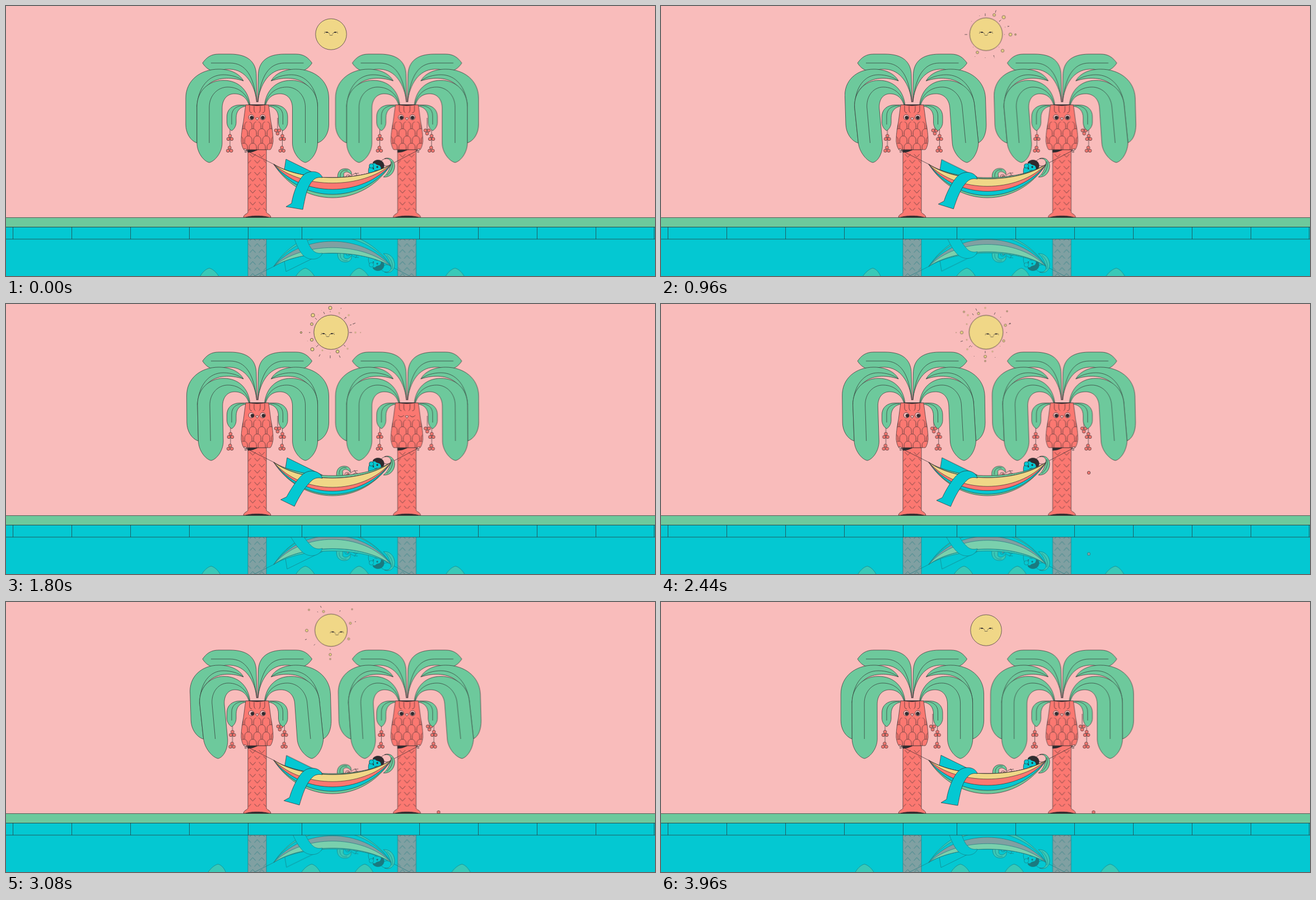
Animation, 1159 px wide and 483 px high, one loop 4 s. Source, as an HTML page without scripts:

```html
<!DOCTYPE html>
<html lang="en">
<head>
<meta charset="utf-8">
<title>Hammock between palms</title>
<style>
:root { --pink:#f9bcbb; --green:#6dc99c; --red:#fb7871; --sea:#04c8d2; --sun:#f0d787; --ink:#2f2b2e; --swing:cubic-bezier(.37,0,.63,1) }
html, body { margin:0; width:100%; height:100%; overflow:hidden; background:var(--pink) }
svg { position:absolute; left:0; top:0; width:1159px; height:483px; overflow:visible }
svg, pattern { stroke:var(--ink); stroke-width:.68; stroke-linejoin:round }
.pink { fill:var(--pink) } .green { fill:var(--green) } .red { fill:var(--red) }
.sea { fill:var(--sea) } .yellow { fill:var(--sun) } .dark { fill:var(--ink) }
.line { fill:none }

/* The scene mirrors itself in the pool */
.scene {
  position:absolute; left:0; top:0; width:1159px; height:374px;
  -webkit-box-reflect:below 1px linear-gradient(rgba(0,0,0,.5), rgba(0,0,0,.5));
}

/* Fronds: one sway curve per side of each palm */
.e1 *, .e2 *, .e3 *, .e4 * { animation-duration:4s; animation-iteration-count:infinite }
.e1 * { animation-timing-function:linear(0,.1 4.8%,.5 12%,.88 20%,1 27%,.93 32%,.5 39.5%,.1 47%,0 52%,.1 56.8%,.5 64%,.9 71.2%,1 76%,.9 80.8%,.5 88%,.1 95.2%,0) }
.e2 * { animation-timing-function:linear(0,.09 4.5%,.45 11%,.81 18%,.9 22.5%,.81 27%,.45 34%,.09 41%,0 45.5%,.09 51%,.45 60%,.81 69%,.9 74.5%,.81 79.6%,.45 87%,.09 95%,0) }
.e3 * { animation-timing-function:linear(0,.09 5%,.43 12%,.77 20%,.85 26%,.77 30%,.43 36%,.09 42%,0 45%,.07 50%,.33 59.5%,.6 69%,.66 75%,.6 80%,.33 87.5%,.07 95%,0) }
.e4 * { animation-timing-function:linear(0,.1 3.6%,.5 9%,.9 14.4%,1 18%,.9 22.8%,.5 30%,.1 37.2%,0 42%,.1 47%,.5 56%,.9 66%,1 72%,.9 78%,.5 86%,.1 94.4%,0) }
.out { d:path("M341 245C329 241 321 227 321 212L321 165C321 133 347 113 380 113C402 113 418 122 424 134C400 126 376 128 362 140C350 150 341 165 341 180L341 245Z") }
.vein { d:path("M341 180C343 145 362 123 388 123C402 123 415 127 424 134") }
.in { d:path("M363 280C353 278 341 262 341 245L341 180C341 152 362 133 388 133C415 133 433 150 436 178L434 178C430 163 420 157 408 157C395 157 386 167 386 183L386 245C386 262 373 278 363 280Z") }
.rib { d:path("M363 245L363 181C363 160 378 145 396 145C418 145 432 160 435 178") }
.l .out { animation-name:outL } .r .out { animation-name:outR }
.l .vein { animation-name:veinL } .r .vein { animation-name:veinR }
.l .in { animation-name:inL } .r .in { animation-name:inR }
.l .rib { animation-name:ribL } .r .rib { animation-name:ribR }
.hang { animation-name:hang }
@keyframes outL { to { d:path("M352 245C340 241 331 227 330.5 212L329 165C326 133 350 113 380 113C402 113 418 122 424 134C400 126 378 128 364 140C352 150 345 165 346 182L353 245Z") } }
@keyframes veinL { to { d:path("M346 182C346 145 364 123 388 123C402 123 415 127 424 134") } }
@keyframes inL { to { d:path("M379 280C369 278 355 262 353 245L346 182C344 154 364 133 389 133C415 133 433 150 436 178L434 178C430 163 420 157 409 157C397 157 389 167 390 183L396 245C397 262 389 278 379 280Z") } }
@keyframes ribL { to { d:path("M374 245L368 181C367 160 380 145 397 145C418 145 432 160 435 178") } }
@keyframes outR { to { d:path("M330 245C320 241 316 227 316 212L317.5 165C319 133 346 113 380 113C402 113 418 122 424 134C400 126 376 128 361 140C349 150 338 165 337 180L329 245Z") } }
@keyframes veinR { to { d:path("M337 180C340 145 361 123 388 123C402 123 415 127 424 134") } }
@keyframes inR { to { d:path("M349.5 280C340 278 330 262 329 245L337 178C339 152 361 133 388 133C415 133 433 150 436 178L434 178C430 163 420 157 406 157C392 157 382 167 381 183L376 245C375 262 360 278 349.5 280Z") } }
@keyframes ribR { to { d:path("M352 245L359 181C361 160 377 145 395 145C418 145 432 160 435 178") } }
@keyframes hang { to { transform:translateX(4.5px) } }

/* Hammock and legs */
.b1 { d:path("M478 283C530 363 636 363 688 283C636 315 530 315 478 283Z") }
.b2 { d:path("M478 283C530 355 636 355 688 283C636 315 530 315 478 283Z"); animation:b2 4s var(--swing) infinite }
.b3 { d:path("M478 283C530 343 636 343 688 283C636 315 530 315 478 283Z"); animation:b3 4s var(--swing) infinite }
.b4 { d:path("M478 283C530 328 636 328 688 283C636 315 530 315 478 283Z"); animation:b4 4s var(--swing) infinite }
.leg { d:path("M565 307C562 297 548 293 536 299C524 305 513 333 510 353L500 359L530 364C534 345 537 322 549 311C553 307 559 306 565 307Z"); animation:leg 4s var(--swing) infinite }
.shin { animation:shin 4s var(--swing) infinite }
.pal { animation:pal 4s var(--swing) infinite }
@keyframes b2 { 47.5% { d:path("M478 283C530 360 636 360 688 283C636 321 530 321 478 283Z") } }
@keyframes b3 { 47.5% { d:path("M478 283C530 352 636 352 688 283C636 321 530 321 478 283Z") } }
@keyframes b4 { 47.5% { d:path("M478 283C530 343 636 343 688 283C636 321 530 321 478 283Z") } }
@keyframes leg { 47.5% { d:path("M565 312C562 300 546 295 534 302C523 308 508 332 501 345L490.5 350L515 362C522 347 534 326 547 315C552 311 559 310 565 312Z") } }
@keyframes shin { 47.5% { transform:translate(2px,1px) } }
@keyframes pal { 47.5% { transform:translate(-2px,-1px) } }

/* Sun */
.disc { transform-origin:580.5px 50.5px; animation:swell 4s var(--swing) infinite }
.face { animation:glance 4s ease-in-out infinite }
.a { --d:-3.9s } .b { --d:-3.25s } .c { --d:-2.35s }
.rays circle { fill:var(--sun); transform-box:fill-box; transform-origin:center; animation:pop 4s var(--d) ease-in-out infinite }
.rays path { fill:none; stroke-dasharray:6 30; animation:dash 4s var(--d) linear infinite }
@keyframes swell { 47.5% { transform:scale(1.11) } }
@keyframes glance { 0%,24%,98%,100% { transform:none } 32%,47% { transform:translate(-6px,6px) } 58%,80% { transform:translate(10.5px,6.5px) } }
@keyframes pop { 0%,55%,100% { transform:scale(0) } 27% { transform:scale(1) } }
@keyframes dash { 0% { stroke-dashoffset:6.5 } 27% { stroke-dashoffset:0 } 55%,100% { stroke-dashoffset:-6.5 } }

.look { animation:look 4s infinite }
.blink { animation:blink 4s step-end infinite }
.drop { animation:drop 4s infinite }
@keyframes look { 0%,38%,92%,100% { transform:none } 43%,85% { transform:translateX(1.3px) } }
@keyframes blink { 43% { opacity:0 } 47% { opacity:1 } }
@keyframes drop {
  0% { transform:translate(764px,260px); opacity:0; animation-timing-function:step-end }
  55% { transform:translate(764px,260px); opacity:1; animation-timing-function:cubic-bezier(.33,0,.67,.33) }
  65% { transform:translate(764px,376px); animation-timing-function:ease-out }
  68% { transform:translate(768px,368px); animation-timing-function:ease-in }
  71% { transform:translate(771px,376px) }
  74%,100% { transform:translate(772.5px,376px); opacity:1 }
}
</style>
</head>
<body>
<svg viewBox="0 0 1159 483">
  <path class="sea" stroke="none" d="M0 417H1159V483H0Z"/>
  <circle class="yellow disc" cx="580.5" cy="50.5" r="27.7"/>
  <g class="face line">
    <path d="M568 49q5-6 10 1M583 50q5-7 10-1M577.500 51q1.500 3 3 1q1.500 2 3-1M570 46.500l-1-1M591 46.500l1-1"/>
    <path class="dark" stroke="none" d="M571 48q2-4 4.500 0ZM585.500 48q2.500-4 4.500 0Z"/>
  </g>
  <g class="rays a">
    <circle cx="565" cy="83" r="2.500"/><circle cx="595" cy="16" r="2.600"/><circle cx="612" cy="20" r="3.200"/><circle cx="624" cy="51" r="3"/>
    <circle cx="633" cy="51" r="1.500"/><circle cx="610" cy="80" r="2.800"/>
    <path d="M579 18v-5M604 28l4-4M597 12l1.500-5M547 51h-6M619 37l3-1M594 88l1 3"/>
  </g>
  <g class="rays b">
    <circle cx="579" cy="7" r="3"/><circle cx="548" cy="20" r="3.200"/><circle cx="546" cy="36" r="2.400"/><circle cx="527" cy="51" r="1.600"/>
    <circle cx="546" cy="64" r="2.600"/><circle cx="547" cy="81" r="3"/><circle cx="592" cy="85" r="2.800"/>
    <path d="M555 28l-3-3M558 73l-4 4M603 73l3 3M614 38l3-1M619 36l5-2M561 90l-2 4M579 92v5M595 92l2 4M613 51h5M569 18l-2-4M604 27l3-4"/>
  </g>
  <g class="rays c">
    <circle cx="618" cy="13" r="1.400"/><circle cx="541" cy="14" r="1.700"/><circle cx="567" cy="17" r="2.500"/><circle cx="537" cy="51" r="3"/>
    <circle cx="615" cy="38" r="2.400"/><circle cx="612" cy="66" r="2.300"/><circle cx="579" cy="94" r="2.800"/><circle cx="579" cy="102" r="1.500"/>
    <path d="M564 12l-2.500-5M539 66l-5 1.500M553 74l-3 3.500M579 88v-4M558 20l-2-3M595 19l2-4M621 36l4-1"/>
  </g>
</svg>

<div class="scene">
<svg viewBox="0 0 1159 483">
<defs>
  <pattern id="scales" x="440.700" y="206" width="16" height="26" patternUnits="userSpaceOnUse">
    <path class="line" d="M1.500 13V8C1.500-2 14.500-2 14.500 8V13M-6.500 26v-5c0-10 13-10 13 0v5M9.500 26v-5c0-10 13-10 13 0v5"/>
  </pattern>
  <pattern id="bark" x="432.5" y="261" width="16.2" height="21.4" patternUnits="userSpaceOnUse">
    <path class="line" d="M3 4l5.100 5.500 5.100-5.500M-5.100 14.700l5.100 5.500 5.100-5.500M11.100 14.700l5.100 5.500 5.100-5.500"/>
  </pattern>
  <g id="cluster" class="red"><circle cy="-3.2" r="2.8"/><circle cx="-3" cy="2.4" r="2.8"/><circle cx="3" cy="2.4" r="2.8"/></g>
  <g id="strand">
    <path d="M0 200V254"/><use href="#cluster" y="235.5"/><use href="#cluster" x="-.7" y="256.5"/>
  </g>
  <g id="pair">
    <path d="M0 200V222"/><use href="#cluster" transform="matrix(1 0 0 -1 0 225)"/>
  </g>
  <g id="plume">
    <path class="green" d="M351 102C358 92 366 86 380 86H400C432 86 447 100 447 125L448 172C444 140 428 114 400 113C385 112 385 117 376 117C364 117 356 110 351 102Z"/>
    <path class="line" d="M366 102H400C428 102 443 125 447.5 172"/>
  </g>
  <g id="sprig">
    <path class="green" d="M403 223C399 221 394.5 215 394.5 208V198C394.5 185 404 177 418 177H437L430 179C418 180 411 188 411 200V208C411 215 407 221 403 223Z"/>
    <path class="line" d="M403 212V197C403 185 411 178 426 178"/>
  </g>
  <g id="crown"><use href="#plume"/><use href="#plume" transform="matrix(-1 0 0 1 897.5 0)"/></g>
  <g id="trunk">
    <use href="#sprig"/><use href="#sprig" transform="matrix(-1 0 0 1 897.5 0)"/>
    <path class="red" d="M432 257H465V369C466 372 472 372 473 378H424C425 372 431 372 432 369Z"/>
    <path fill="url(#bark)" stroke="none" d="M432.5 261H464.5V366H432.5Z"/>
    <path class="dark" d="M428 378C436 374.5 461 374.5 469 378Z"/>
    <path class="red" d="M428 177L424 207C421 222 420 232 420 242C421 250 423 255 425 257H472C474 255 476 250 477 242C477 232 476 222 473 207L469 177Z"/>
    <path fill="url(#scales)" stroke="none" d="M424 207C421 222 420 232 420 242L425 257H472L477 242C477 232 476 222 473 207Z"/>
    <path class="dark" d="M434 176.5Q448 180 463 176.5Z"/>
    <path class="line" d="M435 178v8q0 5 4 5M462 178v8q0 5-4 5M443 179v7q0 4 2.500 5M454 179v7q0 4-2.500 5M433 199q5 6 10 0M453.500 199q5 6 10 0"/>
    <path class="pink" d="M445.500 200.500q3-2 6 0l-3 4Z"/>
    <path class="dark" d="M432 257.500H449Q440 262 432 262Z"/>
  </g>
  <g id="whites" class="pink"><circle cx="438" cy="199" r="4.800"/><circle cx="458.500" cy="199" r="4.800"/></g>
  <g id="pupils" class="dark"><circle cx="438.800" cy="199.800" r="3"/><circle cx="458.500" cy="199.800" r="3"/></g>
  <path id="bow" class="pink" d="M0 0q-7-5-6-1q1 3 6 1q-6 2-4 4q3 1 4-4Z"/>
</defs>

<g class="e1"><g class="hang"><use href="#strand" x="400"/></g></g>
<g class="e2"><g class="hang"><use href="#strand" x="493.500"/><use href="#pair" x="485"/></g></g>
<g class="e3"><g class="hang"><use href="#strand" x="667.500"/></g></g>
<g class="e4"><g class="hang"><use href="#strand" x="760"/><use href="#pair" x="752"/></g></g>

<use href="#crown"/>
<g class="l e1"><path class="green out"/><path class="line vein"/><path class="green in"/><path class="line rib"/></g>
<g class="r e2" transform="matrix(-1 0 0 1 897.5 0)"><path class="green out"/><path class="line vein"/><path class="green in"/><path class="line rib"/></g>
<use href="#trunk"/>
<use href="#whites"/><g class="look"><use href="#pupils"/></g>

<g transform="translate(267.4)">
  <use href="#crown"/>
  <g class="l e3"><path class="green out"/><path class="line vein"/><path class="green in"/><path class="line rib"/></g>
  <g class="r e4" transform="matrix(-1 0 0 1 897.5 0)"><path class="green out"/><path class="line vein"/><path class="green in"/><path class="line rib"/></g>
  <use href="#trunk"/>
  <g class="blink"><use href="#whites"/><use href="#pupils"/></g>
</g>

<path class="line" d="M428 258L478 283M736 258L688 283"/>
<use href="#bow" x="431" y="258"/><use href="#bow" transform="matrix(-1 0 0 1 733 258)"/>

<g class="pal">
  <path class="green" d="M593 313C590 298 596 291 606 291C614 291 618 296 617 302C612 296 606 295 603 300L604 313Z"/>
  <path class="line" d="M597 306C596 297 602 292 610 294M616 304l6-4 8-1M621 306l5-3 4 1M624 298l3 5"/>
  <circle class="line" cx="611" cy="306" r="4"/><circle class="red" cx="612" cy="306" r="1.800"/>
</g>
<path class="sea shin" d="M500 274L497 293L530 310H563V305Z"/>
<path class="dark" d="M655 280C660 273 673 274 675 284C676 291 671 294 664 291Z"/>
<path class="sea" d="M648 301C645 292 650 281 659 281C661 284 664 284 667 285C671 288 671 294 667 299Z"/>
<circle class="sea" cx="652.500" cy="286" r="4"/>
<path class="line" d="M658 294q3 2 5-1M655 290l2-2"/>
<circle class="dark" cx="663" cy="288" r="1.300"/><circle class="dark" cx="656" cy="291" r="1"/>
<path class="line" d="M669 279C673 272 683 271 688 276L687 285Q678 288 672 283"/>

<path class="green b1"/><path class="sea b2"/><path class="red b3"/><path class="yellow b4"/>
<path class="sea leg"/>
<path class="green" d="M674 306C682 300 684 293 687 285C690 277 683 271 676 273C687 269 695 278 694 288C693 299 685 307 674 306Z"/>
<path class="line" d="M680 303C688 297 692 286 689 278"/>
<g class="drop"><circle class="red" r="2.700"/></g>
</svg>
</div>

<svg viewBox="0 0 1159 483">
  <path class="green" d="M-2 378.500H1161V395.500H-2Z"/>
  <path class="sea" d="M-2 395.500H1161V417H-2Z"/>
  <path d="M12.500 395v22M117.500 395v22M222.500 395v22M327.500 395v22M432.500 395v22M528.500 395v22M633.500 395v22M738.500 395v22M843.500 395v22M948.500 395v22M1053.500 395v22M1157.500 395v22"/>
</svg>
</body>
</html>
```
